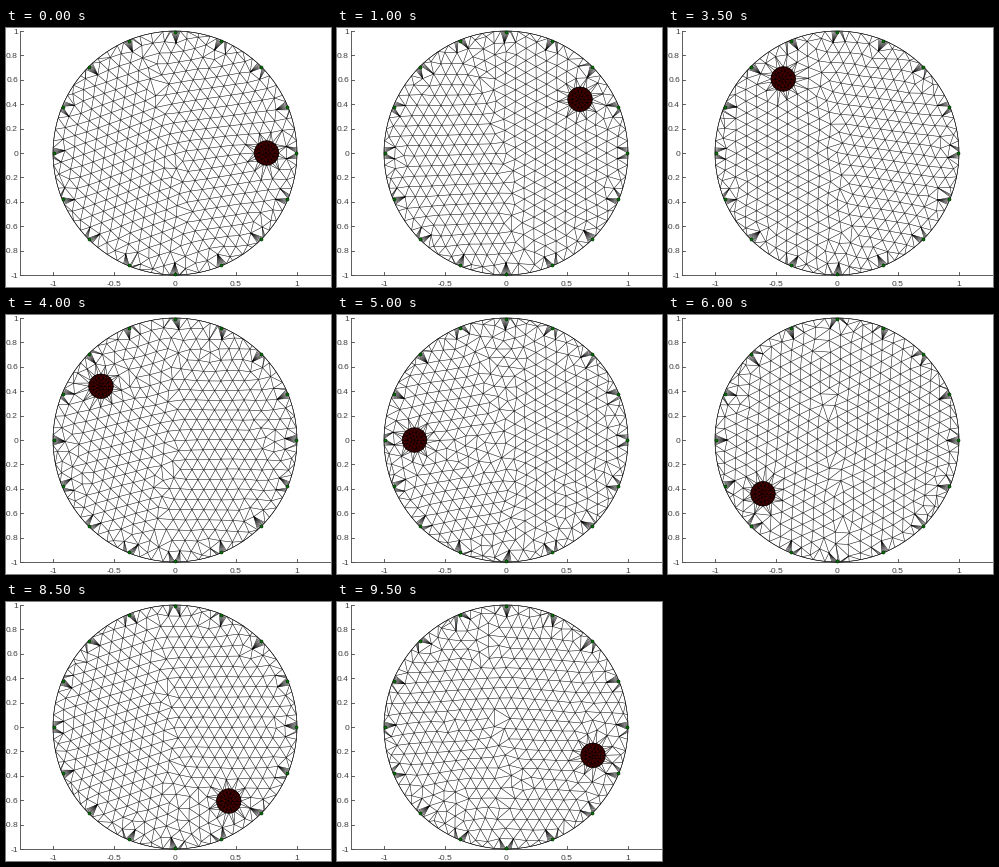
A matplotlib script that plays this animation: 325x259 px, repeating every 10000 ms.

```python
import numpy as np
import matplotlib.pyplot as plt
from matplotlib.animation import FuncAnimation
from matplotlib.collections import LineCollection
from matplotlib.patches import Circle
from matplotlib.tri import Triangulation

W, H, DPI = 325, 259, 100
FRAMES, INTERVAL = 20, 500
CX, CY, R = 169, 125, 122
SPACING = 0.094
ORBIT, BALL = 0.75, 0.1
PX = 72 / DPI

# Lattice tilt (degrees) left and right of the grain border, and disorder
GRAINS = [
    (20, 8, .1), (8, 26, .1), (2, 30, .1), (25, 5, .15), (12, 28, .1),
    (0, 20, .15), (28, 10, .1), (30, -8, .1), (15, 0, .2), (5, 25, .2),
    (10, 30, .24), (22, 30, .1), (27, 27, .1), (0, 12, .15), (30, 14, .1),
    (29, -4, .12), (6, 24, .1), (18, 0, .15), (30, 8, .2), (4, -4, .24),
]


def polar(radius, angle):
    return np.column_stack([radius * np.cos(angle), radius * np.sin(angle)])


def ring(radius, count):
    return polar(radius, 2 * np.pi * np.arange(count) / count)


def to_px(points):
    return np.asarray(points) * [R, -R] + [CX, CY]


def ball_center(k):
    a = 2 * np.pi * k / FRAMES
    return ORBIT * np.array([np.cos(a), np.sin(a)])


def rim_points():
    electrodes = 2 * np.pi * np.arange(16) / 16
    offsets = np.append(np.linspace(-.042, .042, 9), [-.1, .1, np.pi / 16])
    return polar(1, (electrodes[:, None] + offsets).ravel())


def lattice(tilt):
    i, j = np.meshgrid(np.arange(-16, 17), np.arange(-16, 17))
    x = (i + .5 * (j % 2)) * SPACING
    y = j * SPACING * np.sqrt(3) / 2
    c, s = np.cos(np.radians(tilt)), np.sin(np.radians(tilt))
    return np.column_stack([(c * x - s * y).ravel(), (s * x + c * y).ravel()])


def push_out(p, center, gap):
    d = p - center
    r = np.hypot(*d.T)[:, None]
    return center + d * np.maximum(1, gap / np.maximum(r, 1e-9))


def keep_clear(p, center):
    for electrode in ring(1, 16):
        p = push_out(p, electrode, .1)
    p = push_out(p, center, BALL + .07)
    r = np.hypot(*p.T)[:, None]
    return p * np.minimum(1, .968 / np.maximum(r, 1e-9))


def build_mesh(k):
    rng = np.random.default_rng(40 + k)
    center = ball_center(k)
    left, right, disorder = GRAINS[k]
    slant = rng.uniform(-.4, .4)
    grains = []
    for tilt, side in ((left, -1), (right, 1)):
        p = lattice(tilt)
        grains.append(p[side * (p[:, 0] + slant * p[:, 1] + .04) > .02])
    free = np.vstack(grains)
    free = free[(np.hypot(*free.T) < .975)
                & (np.hypot(*(free - center).T) > BALL + .05)]
    free = free + rng.normal(0, disorder * SPACING, free.shape)

    disc = np.vstack([ring(BALL, 24), ring(.064, 14), ring(.029, 7), [[0, 0]]])
    fixed = np.vstack([RIM, disc + center])
    n = len(fixed)
    for _ in range(22):
        free = keep_clear(free, center)
        # a tiny offset keeps clamped nodes from coinciding
        free = free + rng.normal(0, .0005, free.shape)
        points = np.vstack([fixed, free])
        a, b = Triangulation(*points.T).edges.T
        bar = points[a] - points[b]
        length = np.maximum(np.hypot(*bar.T), 1e-6)
        weight = np.where((a < n) | (b < n), .02, .2)
        push = weight * np.maximum(1.12 * SPACING - length, 0) / length
        push = bar * push[:, None]
        force = np.zeros_like(points)
        np.add.at(force, a, push)
        np.add.at(force, b, -push)
        free = free + force[n:]
    points = np.vstack([fixed, keep_clear(free, center)])
    edges = Triangulation(*points.T).edges
    return to_px(points)[edges]


RIM = rim_points()
meshes = [build_mesh(k) for k in range(FRAMES)]

fig = plt.figure(figsize=(W / DPI, H / DPI), dpi=DPI, facecolor="white")
ax = fig.add_axes([0, 0, 1, 1])
ax.set(xlim=(0, W), ylim=(H, 0))
ax.axis("off")


def line(xs, ys):
    ax.plot(xs, ys, color="#505050", lw=.9 * PX, zorder=1)


def label(x, y, value, align):
    ax.text(x, y, f"{value:g}", ha=align, va="center_baseline",
            family="Liberation Sans", size=8.5 * PX, color="#404040")


line([13.5, 13.5], [2.5, 246.5])
line([13.5, W], [246.5, 246.5])
for v in np.round(np.arange(-5, 6) * .2, 1) + 0.0:
    y = CY - R * v
    line([13.5, 16.5], [y, y])
    label(12, y, v, "right")
for v in (-1, -.5, 0, .5, 1):
    x = CX + R * v
    line([x, x], [243.5, 246.5])
    label(x, 255, v, "center")

ball = ax.add_patch(Circle((0, 0), BALL * R, fc="#4c0000", ec="#100000",
                           lw=.6 * PX, zorder=2))
mesh = ax.add_collection(LineCollection([], colors="black", linewidths=.5 * PX,
                                        zorder=3))
ax.add_patch(Circle((CX, CY), R, fill=False, ec="black", lw=.45 * PX, zorder=3))
ax.plot(*to_px(ring(.995, 16)).T, "o", ms=3 * PX, mfc="#007800",
        mec="#002800", mew=.6 * PX, zorder=4)


def update(k):
    ball.center = to_px(ball_center(k))
    mesh.set_segments(meshes[k])
    return ball, mesh


anim = FuncAnimation(fig, update, frames=FRAMES, interval=INTERVAL,
                     repeat=True, repeat_delay=0)
plt.show()
```
